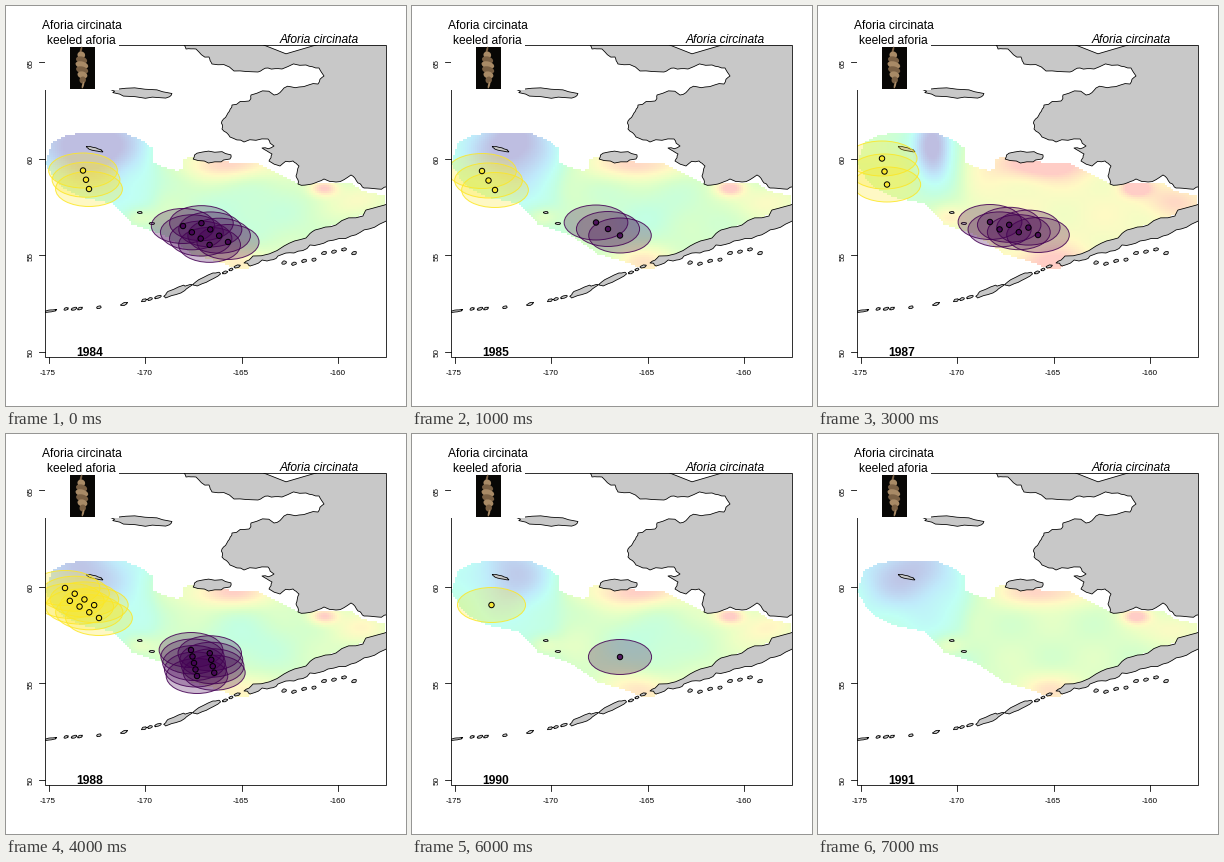
Recreate the animation shown at these times as a matplotlib script. Size 400x400 px, loop 8 s.

```python
import numpy as np
import matplotlib.pyplot as plt
from matplotlib.animation import FuncAnimation
from matplotlib.colors import LinearSegmentedColormap
from matplotlib.patches import Circle, Ellipse, Polygon, Rectangle
from matplotlib.path import Path

PX = 0.72  # points per pixel at 100 dpi
LINE = 0.8 * PX
LEFT, RIGHT, TOP, BOTTOM = 39, 380, 39, 351
DEGREE = 19.3  # pixels per degree
YELLOW, TEAL, PURPLE = "#fde725", "#21918c", "#440154"
YEARS = range(1984, 1992)

plt.rcParams["font.family"] = "Liberation Sans"
rng = np.random.default_rng(4)
fig = plt.figure(figsize=(4, 4), dpi=100, facecolor="white")
ax = fig.add_axes([0, 0, 1, 1])
ax.axis("off")

frame_box = Rectangle((LEFT, TOP), RIGHT - LEFT, BOTTOM - TOP, fill=False,
                      ec="black", lw=LINE, zorder=6)
ax.add_patch(frame_box)


def add_on_map(patch):
    ax.add_patch(patch)
    patch.set_clip_path(frame_box)
    return patch


def label(x, y, text, size=12, **style):
    return ax.text(x, y, text, fontsize=size * PX, ha="center",
                   va="center_baseline", zorder=8, **style)


# Land
def add_land(points):
    add_on_map(Polygon(points, fc="#c8c8c8", ec="black", lw=LINE,
                       joinstyle="round", zorder=2))


def roughen(points, levels=2, amount=0.08):
    """Split every edge and push its middle sideways by a random amount."""
    pts = np.array(points, float)
    for _ in range(levels):
        step = np.roll(pts, -1, axis=0) - pts
        side = np.stack([-step[:, 1], step[:, 0]], axis=1)
        mid = pts + step / 2 + side * rng.normal(0, amount, (len(pts), 1))
        pts = np.stack([pts, mid], axis=1).reshape(-1, 2)
    return pts


def add_island(x, y, w, h, tilt=0):
    a = np.linspace(0, 2 * np.pi, 18, endpoint=False)
    r = 0.5 * rng.uniform(0.8, 1.15, a.size)
    c, s = np.cos(np.radians(tilt)), np.sin(np.radians(tilt))
    u, v = w * r * np.cos(a), h * r * np.sin(a)
    add_land(np.stack([x + c * u - s * v, y + s * u + c * v], axis=1))


add_land(roughen([
    (176, 36), (180, 43), (190, 43), (203, 51), (206, 58), (228, 65),
    (252, 66), (262, 62), (276, 63), (300, 59), (313, 62), (318, 70),
    (312, 78), (293, 81), (278, 82), (268, 89), (245, 89), (243, 95),
    (226, 99), (222, 107), (216, 115), (216, 123), (224, 131), (238, 136),
    (262, 133), (268, 140), (256, 142), (266, 148), (263, 155), (274, 160),
    (287, 155), (293, 160), (290, 170), (292, 178), (306, 178), (318, 173),
    (330, 176), (345, 169), (352, 177), (358, 182), (372, 183), (384, 178),
    (384, 36)]))
add_land(roughen([
    (384, 197), (360, 204), (357, 210), (330, 219), (309, 224), (300, 232),
    (278, 240), (247, 250), (238, 257), (244, 260), (261, 255), (272, 250),
    (288, 247), (304, 239), (322, 235), (345, 230), (363, 223), (384, 213)]))

add_island(206, 151, 36, 11)
add_island(134, 87, 60, 9, 4)
add_island(88, 143, 17, 3, 15)
add_island(134, 206.5, 5, 2)
add_island(146, 217.5, 5, 2)
add_island(201, 273, 28, 6, -25)
add_island(171, 285, 30, 6, -22)
add_island(44, 305, 13, 2, -8)
for x in (60, 68, 74, 93, 118, 138, 144, 152, 219, 225, 231):
    arc = 303 - 43 * ((x - 50) / 182) ** 2.2
    add_island(x, arc, rng.uniform(4, 7), 2.5, -20)
for x in np.linspace(278, 348, 8):
    add_island(x, 258 - 0.2 * (x - 278) + rng.normal(0, 2), 5, 3, -15)

# Temperature field
HEAT = LinearSegmentedColormap.from_list("heat", [
    "#bebee1", "#bfd3f0", "#bfebfb", "#c0fff5", "#c4ffe0",
    "#d6ffcb", "#edffc4", "#fffac4", "#ffe4c4", "#ffcdc6"])
REGION = [
    (39, 157), (46, 137), (60, 129), (78, 127), (118, 127), (138, 135),
    (146, 142), (146, 156), (160, 162), (172, 165), (177, 162), (177, 154),
    (186, 150), (222, 156), (250, 157), (269, 166), (294, 179), (320, 176),
    (345, 177), (357, 185), (379, 190), (379, 201), (358, 208), (312, 225),
    (298, 236), (252, 252), (243, 262), (232, 263), (207, 254), (186, 248),
    (158, 229), (126, 218), (108, 198), (74, 191), (58, 182), (48, 173)]
# Per year: general level, cold pool strength, its x and width, mid-shelf cooling
CLIMATE = {
    1984: (5.0, 4.5, 85, 45, 1.0), 1985: (5.1, 4.0, 100, 38, 1.0),
    1986: (5.3, 4.0, 118, 22, 0.8), 1987: (6.6, 5.5, 115, 20, 0.0),
    1988: (5.1, 3.0, 75, 45, 1.2), 1989: (6.5, 5.0, 111, 14, 3.6),
    1990: (5.4, 3.0, 100, 35, 1.5), 1991: (5.2, 3.0, 90, 45, 0.0)}
CELL = 2
xs = np.arange(LEFT, RIGHT, CELL) + CELL / 2
ys = np.arange(125, 267, CELL) + CELL / 2
gx, gy = np.meshgrid(xs, ys)
cells = np.stack([gx.ravel(), gy.ravel()], axis=1)
outside = ~Path(REGION).contains_points(cells).reshape(gx.shape)


def bump(x, y, w, h):
    return np.exp(-((gx - x) / w) ** 2 - ((gy - y) / h) ** 2)


def heat_field(year):
    level, cold, cold_x, cold_w, mid = CLIMATE[year]
    field = level - 1.8 / (1 + np.exp((gx - 148) / 6))
    field -= cold * bump(cold_x, 140, cold_w, 34)
    field -= mid * bump(238, 208, 45, 30)
    field += 3.6 * bump(225, 158, 45, 15) + 4 * bump(318, 182, 14, 8)
    field += 2.6 * bump(232, 256, 35, 16) + 2.2 * bump(132, 212, 18, 12)
    field += 1.8 * bump(355, 195, 30, 16)
    field += 0.35 * np.sin(gx / 13 + year) * np.cos(gy / 11 + 2 * year)
    return np.ma.masked_where(outside, field)


heat = ax.imshow(heat_field(YEARS[0]), cmap=HEAT, vmin=0, vmax=9, aspect="auto",
                 interpolation="nearest", zorder=1,
                 extent=(xs[0] - 1, xs[-1] + 1, ys[-1] + 1, ys[0] - 1))
heat.set_clip_path(frame_box)

# Catches per year: colour, count, first and last spot, zigzag around that line
CATCHES = {
    1984: [(YELLOW, 3, (77, 164.5), (83, 183), (0, 0)),
           (PURPLE, 8, (184, 217), (215, 239), (7, -3))],
    1985: [(YELLOW, 3, (70, 165), (83, 184), (0, 0)),
           (PURPLE, 3, (184, 216.5), (208, 229.5), (0, 0))],
    1986: [(YELLOW, 1, (96, 190.5), (96, 190.5), (0, 0)),
           (TEAL, 1, (184, 216), (184, 216), (0, 0)),
           (PURPLE, 1, (266.5, 235.5), (266.5, 235.5), (0, 0))],
    1987: [(YELLOW, 3, (64, 152.5), (69, 178.5), (0, 0)),
           (PURPLE, 6, (172, 219), (220, 226), (0, 3))],
    1988: [(YELLOW, 8, (59, 159), (93, 179), (0, 5)),
           (PURPLE, 9, (194, 216), (200, 242), (9, 0))],
    1989: [(YELLOW, 1, (57.5, 155.5), (57.5, 155.5), (0, 0)),
           (TEAL, 4, (78, 176), (106, 184), (0, 6)),
           (PURPLE, 2, (208, 223), (208, 229.5), (0, 0))],
    1990: [(YELLOW, 1, (79.5, 171), (79.5, 171), (0, 0)),
           (PURPLE, 1, (208, 223), (208, 223), (0, 0))],
    1991: []}
bubbles = []


def zigzag(count, start, end, swing):
    sign = (-1.0) ** (np.arange(count) + 1)
    return np.linspace(start, end, count) + sign[:, None] * np.array(swing)


def add_catch(x, y, color):
    """A circle of fixed ground size, widened by latitude, with a centre dot."""
    lat = 60 - (y - 152.5) / DEGREE
    width = 35 / np.cos(np.radians(lat))
    bubbles.append(add_on_map(Ellipse((x, y), width, 35, fc=(color, 0.27),
                                      ec=(color, 0.85), lw=PX, zorder=4)))
    bubbles.append(add_on_map(Circle((x, y), 2.7, fc=(color, 0.85), ec="black",
                                     lw=PX, zorder=5)))


# Axes
for i in range(4):
    x, y = 42.5 + 5 * DEGREE * i, 56 + 5 * DEGREE * i
    ax.plot([x, x], [BOTTOM, BOTTOM + 6], color="black", lw=LINE)
    ax.plot([LEFT - 6, LEFT], [y, y], color="black", lw=LINE)
    label(x - 0.5, 366.5, f"-{175 - 5 * i}", 8)
    label(25, y - 0.5, str(65 - 5 * i), 8, rotation=90)

# Shell picture on its white card
ax.add_patch(Rectangle((LEFT - 0.5, TOP - 0.5), 74, 45, fc="white", ec="none",
                       zorder=7))
ax.add_patch(Rectangle((64, 41), 25, 42, fc="#080705", ec="none", zorder=7))
for i, t in enumerate(np.linspace(0, 1, 8)):
    width = 2 + 11 * np.sin(np.pi * t ** 0.9)
    tone = "#a88a66" if i % 2 else "#7a6044"
    ax.add_patch(Ellipse((75 + 2 * t, 44 + 35 * t), width, 7, angle=15,
                         fc=tone, ec="none", zorder=7))

label(75.5, 18.5, "Aforia circinata")
label(75.5, 33.5, "keeled aforia")
label(313.5, 32.5, "Aforia circinata", style="italic")
year_text = label(83.5, 345.5, "", weight="bold")

ax.set_xlim(0, 400)
ax.set_ylim(400, 0)


def update(i):
    year = YEARS[i]
    heat.set_data(heat_field(year))
    year_text.set_text(str(year))
    while bubbles:
        bubbles.pop().remove()
    for color, *line in CATCHES[year]:
        for x, y in zigzag(*line):
            add_catch(x, y, color)
    return []


anim = FuncAnimation(fig, update, frames=len(YEARS), interval=1000, repeat=True,
                     repeat_delay=0, blit=False)
plt.show()
```
